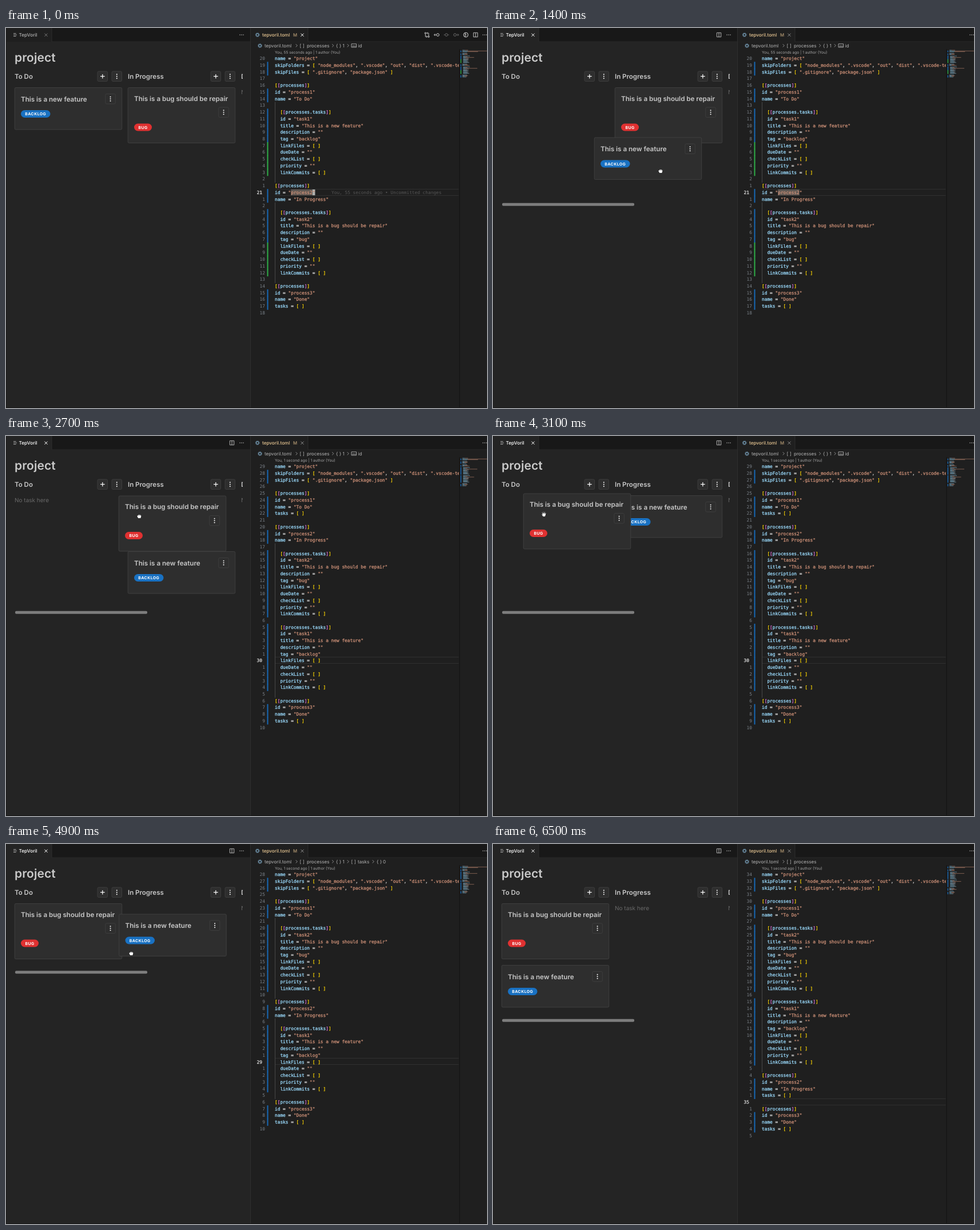
Recreate the animation shown at these times as an HTML page. Size 841 px wide and 666 px high, loop 6.86 s.

```html
<!DOCTYPE html>
<html lang="en">
<head>
<meta charset="utf-8">
<title>Kanban board</title>
<style>
html, body { margin: 0; width: 100%; height: 100%; overflow: hidden; background: #1f1f1f; }
svg { display: block; width: 841px; height: 666px; font-family: Inter, "Open Sans", sans-serif; }
text { white-space: pre; text-rendering: geometricPrecision; }
.mono { font: 7.8px "DejaVu Sans Mono", monospace; }
.code { stroke-width: .28px; }
</style>
</head>
<body>
<svg id="stage" viewBox="0 0 841 666" xmlns="http://www.w3.org/2000/svg"></svg>
<script>
const LOOP = 6860, STEP = 100;
const ROW = 11.73, FIRST_ROW = 53.4, CHAR = 4.696;
const GOLD = '#ffd700', PINK = '#da70d6', KEY = '#9cdcfe', STRING = '#ce9178', PLAIN = '#d4d4d4';
const BLUE = '#1769b5', GREEN = '#2fae48';

const rect = (x, y, w, h, fill, more = '') =>
  `<rect x="${x}" y="${y}" width="${w}" height="${h}" fill="${fill}" ${more}/>`;
const text = (x, y, size, fill, str, more = '') =>
  `<text x="${x}" y="${y}" font-size="${size}" fill="${fill}" ${more}>${str}</text>`;
const line = (d, color, width = 1) =>
  `<path d="${d}" fill="none" stroke="${color}" stroke-width="${width}"/>`;
const ring = (x, y, r, color) =>
  `<circle cx="${x}" cy="${y}" r="${r}" fill="none" stroke="${color}"/>`;
const dots = (x, y, gap, color, down, r = 0.85) => [-1, 0, 1].map(k =>
  `<circle cx="${x + (down ? 0 : k * gap)}" cy="${y + (down ? k * gap : 0)}" r="${r}" fill="${color}"/>`).join('');
const close = (x, y, color) =>
  line(`M${x - 2.6} ${y - 2.6}l5.2 5.2m0 -5.2l-5.2 5.2`, color, 1);
const gear = (x, y) =>
  `<circle cx="${x}" cy="${y}" r="2.3" fill="none" stroke="#6d8fa6" stroke-width="1.4"/>
   <circle cx="${x}" cy="${y}" r="3.4" fill="none" stroke="#6d8fa6" stroke-width="1" stroke-dasharray="1.33"/>`;
const splitIcon = (x, y, color) =>
  line(`M${x - 3.7} ${y - 3.7}h7.4v7.4h-7.4zM${x} ${y - 3.7}v7.4`, color, 0.9);

// Position on a path of [time, ...values] points.
function track(points, t) {
  if (t <= points[0][0]) return points[0].slice(1);
  for (let i = 1; i < points.length; i++) {
    const [a, b] = [points[i - 1], points[i]];
    if (t <= b[0]) {
      const k = (t - a[0]) / (b[0] - a[0]);
      return a.slice(1).map((v, j) => v + (b[j + 1] - v) * k);
    }
  }
  return points[points.length - 1].slice(1);
}

const featurePath = [
  [900, 15, 104.5], [1000, 30, 118], [1400, 177, 192], [1500, 204, 199], [1700, 213, 202.5],
  [1800, 213, 212.5], [2500, 213, 212.5], [2600, 213, 202.5], [2900, 213, 202.5], [3100, 213, 104.5],
  [4800, 213, 104.5], [4900, 197.5, 123], [5200, 80, 164], [5300, 38, 189], [5500, 16, 202.5], [5600, 15, 212.5]
];
const bugPath = [
  [2600, 213, 104.5], [2700, 197, 105], [2800, 138, 104], [2900, 92, 102],
  [3000, 64, 101], [3100, 53, 101], [3300, 22, 104], [3500, 15, 104.5]
];
const handPath = [
  [100, 300, 300], [600, 131, 164], [900, 131, 164], [1000, 146, 178], [1400, 293, 251], [1500, 320, 258],
  [1900, 322, 260], [2400, 249, 141], [2600, 249, 141], [2700, 233, 141], [2800, 174, 140], [2900, 128, 138],
  [3100, 89, 137], [4300, 89, 137], [4700, 274, 146], [4800, 274, 146], [4900, 219, 192], [5200, 101, 233]
];
const scrollPath = [
  [1100, 224.5], [1300, 309], [3500, 309], [3700, 237.5], [3800, 224.5], [5000, 224.5], [5300, 309]
];
const grabs = [[900, 1500], [2600, 3100], [4900, 5200]];

const feature = { id: 'task1', title: 'This is a new feature', tag: 'backlog', height: 74,
  color: '#1971c2', badge: 51.5, titleY: 24, menuY: 11, tagY: 46 };
const bug = { id: 'task2', title: 'This is a bug should be repair', tag: 'bug', height: 97.5,
  color: '#e03131', badge: 31, titleY: 23.3, menuY: 34.5, tagY: 69.5 };

const codeStates = [
  { from: 0, todo: [feature], doing: [bug], current: 20 },
  { from: 1900, todo: [], doing: [bug, feature], current: 29 },
  { from: 3600, todo: [bug], doing: [feature], current: 28 },
  { from: 5700, todo: [bug, feature], doing: [], current: 34 }
];

const taskLines = task => ['', '  [[processes.tasks]]', `  id = "${task.id}"`, `  title = "${task.title}"`,
  '  description = ""', `  tag = "${task.tag}"`, '  linkFiles = [ ]', '  dueDate = ""',
  '  checkList = [ ]', '  priority = ""', '  linkCommits = [ ]'];

function codeLines({ todo, doing }) {
  const lines = ['name = "project"',
    'skipFolders = [ "node_modules", ".vscode", "out", "dist", ".vscode-test" ]',
    'skipFiles = [ ".gitignore", "package.json" ]', ''];
  [['To Do', todo], ['In Progress', doing], ['Done', []]].forEach(([name, tasks], i) => {
    lines.push('[[processes]]', `id = "process${i + 1}"`, `name = "${name}"`);
    lines.push(...(tasks.length ? tasks.flatMap(taskLines) : ['tasks = [ ]']), '');
  });
  return lines;
}

function colorize(str) {
  let depth = 0;
  return str.replace(/"[^"]*"|[\[\]]|[=,]|[\w.]+/g, token => {
    let color = KEY;
    if (token[0] === '"') color = STRING;
    else if (token === '[') color = depth++ ? PINK : GOLD;
    else if (token === ']') color = --depth ? PINK : GOLD;
    else if (/[=,]/.test(token)) color = PLAIN;
    return `<tspan fill="${color}" stroke="${color}">${token}</tspan>`;
  });
}

function minimap(lines, barColor) {
  const pitch = 1.27, char = 0.62;
  return lines.map((str, i) => {
    const body = str.trim();
    if (!body) return '';
    const y = 38.5 + i * pitch, x = 798 + (str.length - body.length) * char;
    const quote = body.indexOf('"');
    const head = quote < 0 ? body.length : quote;
    return rect(x, y, head * char, 0.9, KEY, 'opacity=".55"') +
      (quote < 0 ? '' : rect(x + head * char, y, (body.length - head) * char, 0.9, STRING, 'opacity=".6"')) +
      (barColor(str, i) ? rect(794.7, y - 0.2, 1.4, pitch + 0.3, barColor(str, i)) : '');
  }).join('');
}

function editor(state, focused) {
  const first = state === codeStates[0];
  const lines = codeLines(state);
  const rowY = i => FIRST_ROW + i * ROW;
  const barColor = (str, i) => {
    if (!str || !i || str === '[[processes]]') return null;
    return first && /^  (link|due|check|prio)/.test(str) ? GREEN : BLUE;
  };
  const top = Math.floor(rowY(state.current) - ROW / 2) + 0.5;
  let out = line(`M471 ${top}H791.5M471 ${top + 11}H791.5`, '#303030', 1);
  if (first) {
    out += rect(470 + CHAR * 6, top + 0.5, CHAR * 8, ROW - 1.5, '#5f5853');
    if (focused) {
      out += rect(470 + CHAR * 14, top + 0.5, CHAR, ROW - 1.5, '#aeafad') +
        text(569, rowY(state.current) + 2.8, 7.8, '#555', 'You, 55 seconds ago • Uncommitted changes', 'class="mono"');
    }
  }
  lines.forEach((str, i) => {
    const y = rowY(i), now = i === state.current;
    const inTask = str.startsWith('  ') || (!str && ((lines[i + 1] || '').startsWith('  ') || (lines[i - 1] || '').startsWith('  ')));
    if (inTask) out += rect(470, y - ROW / 2, 1, ROW + 0.6, '#484848');
    if (barColor(str, i)) out += rect(456.5, y - ROW / 2, 2, ROW + 0.6, barColor(str, i));
    out += now ? text(438.5, y + 2.8, 7.8, '#d8d8d8', i + 1, 'class="mono code" stroke="#d8d8d8"')
      : text(453, y + 2.8, 7.8, '#7b828a', Math.abs(i - state.current), 'class="mono" text-anchor="end"');
    out += `<text class="mono code" x="470" y="${y + 2.8}">${colorize(str)}</text>`;
  });
  const age = first ? '55 seconds' : '1 second';
  return `<g clip-path="url(#code)">${out}</g>` +
    text(470, 45.2, 6.6, '#a8a8a8', `You, ${age} ago | 1 author (You)`) +
    rect(792, 37, 2, 629, '#181818') + `<g clip-path="url(#map)">${minimap(lines, barColor)}</g>`;
}

function breadcrumb(t) {
  const crumb = (x, str) => text(x, 33.9, 8.1, '#b4b4b4', str);
  const arrow = x => line(`M${x - 1.3} 28.2l2.6 2.6l-2.6 2.6`, '#9a9a9a', 0.9);
  let out = gear(444, 31) + crumb(452, 'tepvoril.toml') + arrow(508) + crumb(513.5, '[ ]') + crumb(526, 'processes');
  if (t >= 5700) return out;
  out += arrow(571.5) + crumb(577, '{ }') + crumb(588.5, '1') + arrow(598);
  if (t >= 4000) return out + crumb(603.5, '[ ]') + crumb(615, 'tasks') + arrow(642) + crumb(648, '{ }') + crumb(659, '0');
  return out + line('M604 27.8h8.6v6h-8.6z', '#b4b4b4', 0.9) +
    text(605.2, 32.6, 4.2, '#b4b4b4', 'abc') + crumb(615.5, 'id');
}

function editorIcons() {
  const c = '#d0d0d0', dim = '#6a6a6a';
  return ring(733.3, 9, 1.2, c) + ring(739, 15.2, 1.2, c) +
    line('M733.3 10.2v5h3.2M735 13.6l1.6 1.6l-1.6 1.6M739 14v-5h-3.2M737.3 7.4l-1.6 1.6l1.6 1.6', c, 0.9) +
    ring(755, 12, 2.3, c) + line('M752.5 12h-4M750.5 10l-2 2l2 2', c, 0.9) +
    ring(770, 12, 2.3, dim) + line('M765.5 12h2.2M772.3 12h2.2', dim, 0.9) +
    ring(785, 12, 2.3, dim) + line('M787.5 12h4M789.5 10l2 2l-2 2', dim, 0.9) +
    ring(804, 12, 4, c) + line('M803 8v8M803 10.5l2.5 2.2', c, 1) + splitIcon(821, 12, c);
}

function chrome(focused) {
  const on = '#fff', off = '#8b8b8b';
  return rect(0, 0, 427, 666, '#242424') + rect(427, 0, 414, 666, '#1f1f1f') +
    rect(0, 0, 841, 24, '#181818') + rect(0, 23.5, 841, 0.8, '#2b2b2b') +
    rect(1, 0, 79, 24.4, focused ? '#1f1f1f' : '#242424') + rect(428, 0, 100, 24.4, '#1f1f1f') +
    line('M80 0V24M528 0V24M427.5 0V666', '#303030', 0.9) +
    rect(0, 0, 1, 666, '#181818') + rect(0, 665, 841, 1, '#161616') +
    line('M13 9.5h4.6M13 12h6M13 14.5h4.6', '#b5b5b5', 0.9) +
    text(22.5, 15, 8.25, focused ? '#b0b0b0' : on, 'TepVoril', 'font-weight="500"') + close(70, 12.2, focused ? '#777' : on) +
    dots(412, 12, 3, '#c5c5c5', false, 0.75) + (focused ? '' : splitIcon(395, 12, '#c5c5c5')) +
    gear(439.7, 12) + text(448, 15, 8.15, '#e8c793', 'tepvoril.toml', 'font-weight="500"') +
    text(502, 15, 7.8, '#b99e76', 'M', 'font-weight="500"') + close(518, 12.2, focused ? on : off) +
    (focused ? editorIcons() : '') + dots(837, 12, 3, '#c5c5c5', false, 0.75);
}

const button = (x, y) => rect(x, y, 17.5, 17.5, '#2e2e2e', 'rx="2" stroke="#424242" stroke-width=".8"');
const menuButton = (x, y) => button(x, y) + dots(x + 8.75, y + 8.75, 3.4, '#fff', true, 1);

function column(x, name, empty) {
  return text(x, 88.5, 11.5, '#c9c9c9', name, 'font-weight="600"') +
    button(x + 145, 76) + line(`M${x + 150} 84.7h7.6m-3.8 -3.8v7.6`, '#fff', 1.2) + menuButton(x + 170, 76) +
    (empty ? text(x, 116, 10, '#696969', 'No task here') : '');
}

function card(task, [x, y]) {
  return `<g transform="translate(${x} ${y})">` +
    rect(0.2, 0, 187.5, task.height - 0.5, '#2e2e2e', 'rx="2" stroke="#424242" stroke-width=".9"') +
    text(11, task.titleY, 11.6, '#c9c9c9', task.title, 'font-weight="600"') + menuButton(158.8, task.menuY) +
    rect(11, task.tagY - 6.5, task.badge, 13, task.color, 'rx="6.5"') +
    text(11 + task.badge / 2, task.tagY + 2.6, 7, '#fff', task.tag.toUpperCase(),
      'font-weight="700" letter-spacing=".4" text-anchor="middle"') + '</g>';
}

function hand([x, y], closed) {
  const shape = closed
    ? 'M-4 -.6q.2 -1.6 1.4 -1.2q.1 -1.8 1.5 -1.3q.9 -1 1.7 0q1.2 -.7 1.7 .5q1.6 -.2 1.5 1.3l-.3 2l-.9 2.8h-4.2l-2 -2.4z'
    : 'M-4.6 .2q.8 -1 2 .4l-1.3 -3.4q.6 -1.2 1.5 -.2l.8 1.6l-.4 -2.9q.9 -1 1.6 .1l.5 2.6l.5 -2.4q1 -.8 1.5 .3l-.1 2.6l.9 -1.6q1.1 -.4 1.2 .7l-1.1 4.4l-.8 2h-3.8z';
  const knuckles = closed ? line('M-1.1 -2.6v1.4M.6 -2.8v1.6M2.3 -2.2v1.2', '#111', 0.5) : '';
  return `<g transform="translate(${x} ${y})"><path d="${shape}" fill="#fff" stroke="#111" stroke-width=".8" stroke-linejoin="round"/>${knuckles}</g>`;
}

function board(t, focused) {
  const cards = [card(bug, track(bugPath, t)), card(feature, track(featurePath, t))];
  if (t >= 2600 && t < 3600) cards.reverse();
  const [scrollY] = track(scrollPath, t);
  return text(15, 59, 21.1, '#c9c9c9', 'project', 'font-weight="600"') +
    '<g clip-path="url(#board)">' + column(15, 'To Do', t >= 1700 && t < 2900) +
    column(213, 'In Progress', t >= 5600) + column(411, 'Done', true) + cards.join('') + '</g>' +
    (focused ? '' : rect(16, scrollY - 2.2, 231, 5, '#7d7d7d', 'rx="2"'));
}

const defs = `<defs><clipPath id="board">${rect(0, 25, 414, 640, '#000')}</clipPath>
  <clipPath id="code">${rect(428, 37, 365.5, 628, '#000')}</clipPath>
  <clipPath id="map">${rect(794, 36, 47, 629, '#000')}</clipPath></defs>`;

const stage = document.getElementById('stage');

function draw(t) {
  const focused = t < 600;
  const state = codeStates.filter(s => s.from <= t).pop();
  const closed = grabs.some(([a, b]) => t >= a && t < b);
  stage.innerHTML = defs + chrome(focused) + breadcrumb(t) + editor(state, focused) + board(t, focused) +
    (t >= 100 && t < 6400 ? hand(track(handPath, t), closed) : '');
}

const start = performance.now();
let shown = -1;
function tick() {
  const t = Math.min(6500, Math.floor(((performance.now() - start) % LOOP) / STEP) * STEP);
  if (t !== shown) draw(shown = t);
  requestAnimationFrame(tick);
}
tick();
</script>
</body>
</html>
```
